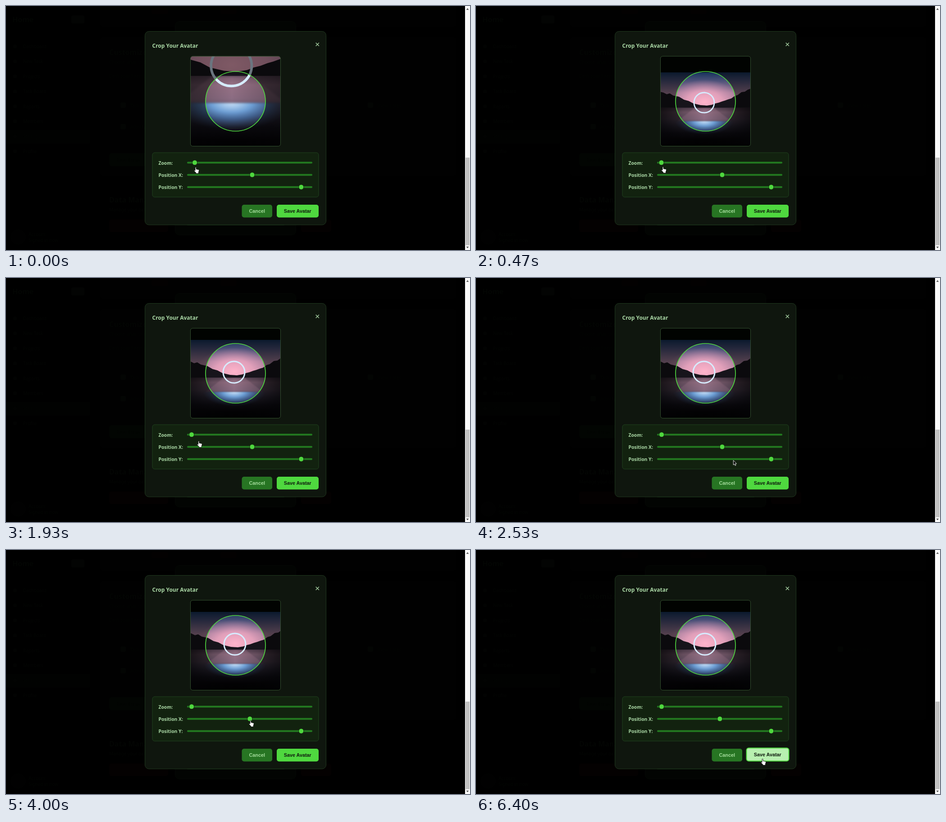
Recreate the animation shown at these times as an HTML page. Size 1030 px wide and 544 px high, loop 8800 ms.

```html
<!DOCTYPE html>
<html lang="en">
<head>
<meta charset="utf-8">
<title>Avatar cropper</title>
<style>
  html, body { margin: 0; width: 100%; height: 100%; overflow: hidden; background: #000; }
  svg { display: block; width: 1030px; height: 544px; }
  text { font-family: "Noto Sans", "Open Sans", sans-serif; font-weight: 600; fill: #abd9a6; }
  .btn { font: bold 10.8px "Liberation Sans", Arial, sans-serif; text-anchor: middle; }
  .dim text { fill: #030503; font-size: 10px; font-weight: 400; }
  .dim .head { font-size: 16px; font-weight: 700; }
</style>
</head>
<body>
<svg viewBox="0 0 1030 544" xmlns="http://www.w3.org/2000/svg">
  <defs>
    <linearGradient id="sky" x1="0" y1="0" x2="0" y2="1">
      <stop offset="0" stop-color="#17345c"/>
      <stop offset=".22" stop-color="#4b5078"/>
      <stop offset=".55" stop-color="#a57e9b"/>
      <stop offset="1" stop-color="#c18a9f"/>
    </linearGradient>
    <radialGradient id="glow">
      <stop offset="0" stop-color="#ffb4cb"/>
      <stop offset=".5" stop-color="#f3aac4" stop-opacity=".75"/>
      <stop offset="1" stop-color="#d898b8" stop-opacity="0"/>
    </radialGradient>
    <linearGradient id="lake" x1="0" y1="0" x2="0" y2="1">
      <stop offset="0" stop-color="#5c4657"/>
      <stop offset=".12" stop-color="#846477"/>
      <stop offset=".3" stop-color="#735d72"/>
      <stop offset=".38" stop-color="#5b4d62"/>
      <stop offset=".5" stop-color="#3b3546"/>
      <stop offset=".68" stop-color="#16141d"/>
      <stop offset=".85" stop-color="#060508"/>
      <stop offset="1" stop-color="#020203"/>
    </linearGradient>
    <linearGradient id="sides">
      <stop offset=".12" stop-color="#08070c" stop-opacity=".8"/>
      <stop offset=".34" stop-color="#08070c" stop-opacity=".25"/>
      <stop offset=".5" stop-color="#08070c" stop-opacity="0"/>
      <stop offset=".66" stop-color="#08070c" stop-opacity=".25"/>
      <stop offset=".88" stop-color="#08070c" stop-opacity=".8"/>
    </linearGradient>
    <radialGradient id="shine" cx=".5" cy="0" r=".5" gradientTransform="scale(1 2)">
      <stop offset="0" stop-color="#c4dcf6"/>
      <stop offset=".15" stop-color="#a3c6ea"/>
      <stop offset=".35" stop-color="#6d9ed4"/>
      <stop offset=".6" stop-color="#4671a8" stop-opacity=".75"/>
      <stop offset="1" stop-color="#2c4266" stop-opacity="0"/>
    </radialGradient>
    <filter id="soft" x="-20%" y="-30%" width="140%" height="160%"><feGaussianBlur stdDeviation="1"/></filter>
    <clipPath id="frame"><rect x="410" y="112.500" width="199" height="199.500" rx="4.500"/></clipPath>
  </defs>

  <rect width="1030" height="544"/>
  <g class="dim" id="page"></g>

  <rect x="308.500" y="56.500" width="402" height="431.500" rx="9" fill="#0f160e" stroke="#20391f"/>
  <text x="324.500" y="93.300" font-size="12">Crop Your Avatar</text>
  <path d="M687.700 82l7.200 7.200m0-7.200l-7.200 7.200" stroke="#a2cb9e" stroke-width="1.500"/>

  <g clip-path="url(#frame)">
    <rect x="409" y="112" width="201" height="201" fill="#030703"/>
    <g id="photo">
      <rect x="-162" y="-159" width="312" height="88" fill="url(#sky)"/>
      <ellipse cx="-6" cy="-88" rx="85" ry="54" fill="url(#glow)"/>
      <path d="M-162-130L-140-124-122-116-103-111-95-107-88-109-80-104-66-101-54-94-43-91-32-85-15-81
        0-80 12-82 20-85 28-87 36-90 43-92 51-95 58-97 66-103 73-105 82-112 90-113 97-118 120-126 150-132V-73H-162z" fill="#17141b"/>
      <rect x="-162" y="-75" width="312" height="89" fill="url(#lake)"/>
      <path d="M-30-74H18L58-43H-70z" fill="#c492a8" opacity=".3" filter="url(#soft)"/>
      <rect x="-162" y="-75" width="312" height="89" fill="url(#sides)"/>
      <path d="M-76-43A70 32 0 0 0 64-43z" fill="url(#shine)" filter="url(#soft)"/>
      <circle cx="-6.500" cy="-87" r="24" fill="none" stroke="#d6ecff" stroke-width="3"/>
    </g>
    <path d="M409 112h201v201h-201zM443 212.500a66.500 66.500 0 0 0 133 0a66.500 66.500 0 0 0-133 0z" fill-rule="evenodd" opacity=".5"/>
  </g>
  <circle cx="509.500" cy="212.500" r="66.500" fill="none" stroke="#4fd83f" stroke-width="1.700"/>
  <rect x="409.500" y="112" width="200" height="200.500" rx="5" fill="none" stroke="#33502f"/>

  <rect x="325" y="327" width="369" height="99" rx="5" fill="#12220f" stroke="#20431e"/>
  <g id="sliders"></g>

  <rect x="523.500" y="443" width="67.500" height="28.500" rx="5" fill="#277523"/>
  <text class="btn" x="557.200" y="460.700" style="fill:#a4dd9c">Cancel</text>
  <rect id="save" rx="5"/>
  <text class="btn" id="saveText" x="647.300" style="fill:#0f1a0e">Save Avatar</text>

  <rect x="1019" width="11" height="544" fill="#fafafa"/>
  <rect x="1020" y="338" width="9" height="195.500" fill="#c1c1c1"/>
  <path d="M1021.500 8.500l3-3.500 3 3.500zM1021.500 536.500l3 3.500 3-3.500z" fill="#505050"/>

  <path id="hand" d="M3 1.200Q4.100 0 5.100 1.200V5.200L10.300 6.300Q11.700 6.800 11.500 8.300L10.300 12.500V14.800H4.700V13.200L.6 9Q.4 7.200 2 7.800L3 8.600z" fill="#fff" stroke="#000" stroke-width=".8"/>
  <path id="arrow" d="M0 0V10.300L2.400 8.200 4 11.800 5.700 11 4.100 7.500H7.200z" fill="#000" stroke="#fff" stroke-width=".9"/>
</svg>

<script>
const $ = id => document.getElementById(id);
const LOOP = 8800, FPS = 15;

function add(parent, name, attrs, label) {
  const el = document.createElementNS("http://www.w3.org/2000/svg", name);
  for (const k in attrs) el.setAttribute(k, attrs[k]);
  if (label) el.textContent = label;
  return parent.appendChild(el);
}
function set(el, attrs) {
  for (const k in attrs) el.setAttribute(k, attrs[k]);
}

// Dimmed page behind the dialog
const page = $("page");
const box = (x, y, width, height, fill, rx = 3, stroke = "none") =>
  add(page, "rect", { x, y, width, height, fill, rx, stroke });
const note = (x, y, label, cls = "") => add(page, "text", { x, y, class: cls }, label);

box(208.5, -10, 792, 56, "#010101", 6);
box(208.5, 70, 792, 308, "#010101", 6);
box(375.5, 34.5, 268, 476, "#020402", 9, "#040804");
box(0, 276, 187, 31, "#010201");
box(145, 21, 29, 18, "#030403");
box(229, 328, 90, 29, "#020502", 5);
box(229, 476, 131, 28, "#040101", 5);
box(655, 476, 67, 28, "#040101", 5);
box(323, 4, 37, 14, "#030101");
box(476, 4, 36, 14, "#030101");
box(402, 487, 216, 2, "#0a240a", 1);
for (const [x, y] of [[254, 215], [254, 263], [803, 215]]) box(x, y, 12, 12, "#030503", 2);
add(page, "circle", { cx: 27, cy: 515, r: 16, fill: "#010101", stroke: "#030403" });
note(14, 36, "Home", "head");
["Dashboard", "New Task", "Projects", "Task Board", "Reports", "Members", "Settings", "Profile"]
  .forEach((s, i) => {
    box(16, 86 + i * 33.4, 8, 8, "#020302", 2);
    note(38, 94 + i * 33.4, s);
  });
note(229, 109, "Customize", "head");
note(229, 129, "Choose what to show");
note(229, 160, "Dashboard items");
note(276, 226, "Tasks");
note(276, 273, "Activity");
note(823, 226, "Show notes");
note(246, 347, "Save Items");
note(229, 438, "Data Management", "head");
note(229, 458, "Manage your data");
note(50, 513, "Account");
note(50, 526, "Signed in now");

const thumbs = ["Zoom:", "Position X:", "Position Y:"].map((label, i) => {
  const y = 349.2 + i * 27.25, g = $("sliders");
  add(g, "text", { x: 338.5, y: y + 4.5, "font-size": 10.3 }, label);
  add(g, "rect", { x: 402, y: y - 2, width: 278, height: 4, rx: 2, fill: "#237a20" });
  return add(g, "circle", { cy: y, r: 5.6, fill: "#4fd83f", stroke: "#12220f", "stroke-width": 1 });
});

// Tracks: [tick, value, ...], linear between keys
const zoomKeys = [[3, 419], [4, 418], [5, 416.35], [6, 413.5], [7, 411.5], [12, 411.5], [13, 412]];
const panKeys = [[44, 546.5], [50, 552], [53, 551], [58, 551], [59, 546], [60, 541.3]];
const hoverKeys = [[70, 0], [71, .3], [73, .3], [74, .5], [77, 1]];
const cursorKeys = [
  [3, 421, 358.5], [4, 420, 358], [5, 416.5, 357.5], [7, 415, 357.5], [12, 415, 357.5], [13, 415.5, 357.5],
  [28, 415.5, 357.5], [30, 440, 368], [34, 605, 428], [35, 626, 437.5], [36, 612, 430], [38, 571.3, 406.5],
  [39, 571.3, 406.5], [43, 549, 379.5], [50, 556, 379.5], [53, 554, 379], [55, 554, 379], [56, 553, 379],
  [58, 553, 379], [59, 548, 379], [60, 542.8, 379.3], [66, 542.8, 379.3], [68, 572, 408],
  [70, 626, 458], [71, 636.8, 465.3], [95, 636.8, 465.3], [96, 636, 465]
];

function at(keys, tick, col = 1) {
  const i = keys.findIndex(k => k[0] >= tick);
  if (i < 0) return keys[keys.length - 1][col];
  if (i === 0) return keys[0][col];
  const a = keys[i - 1], b = keys[i];
  return a[col] + (b[col] - a[col]) * (tick - a[0]) / (b[0] - a[0]);
}
const mix = (a, b, p) => `rgb(${a.map((v, i) => Math.round(v + (b[i] - v) * p))})`;

function draw(ms) {
  const tick = Math.floor(ms * FPS / 1000 + .055);
  const zoom = at(zoomKeys, tick), pan = at(panKeys, tick), p = at(hoverKeys, tick);
  const scale = 1 + (zoom - 412) * .126;
  const dx = 512.5 + (546.5 - pan) * .38;
  $("photo").setAttribute("transform", `translate(${dx} 297) scale(${scale})`);
  [zoom, pan, 655.3].forEach((x, i) => thumbs[i].setAttribute("cx", x));

  set($("save"), {
    x: 601 - .5 * p, y: 443 - 1.5 * p, width: 93 + p, height: 28.5 + .5 * p,
    fill: mix([79, 216, 63], [184, 240, 176], p),
    stroke: "#4fd83f", "stroke-width": 2 * p
  });
  $("saveText").setAttribute("y", 460.7 - p);

  const x = at(cursorKeys, tick, 1), y = at(cursorKeys, tick, 2);
  const isArrow = (tick >= 30 && tick < 43) || (tick > 67 && tick < 70);
  set($("hand"), { transform: `translate(${x - 4} ${y})`, visibility: isArrow ? "hidden" : "visible" });
  set($("arrow"), { transform: `translate(${x} ${y})`, visibility: isArrow ? "visible" : "hidden" });
}

const start = performance.now();
function loop() {
  draw((performance.now() - start) % LOOP);
  requestAnimationFrame(loop);
}
draw(0);
requestAnimationFrame(loop);
</script>
</body>
</html>
```
